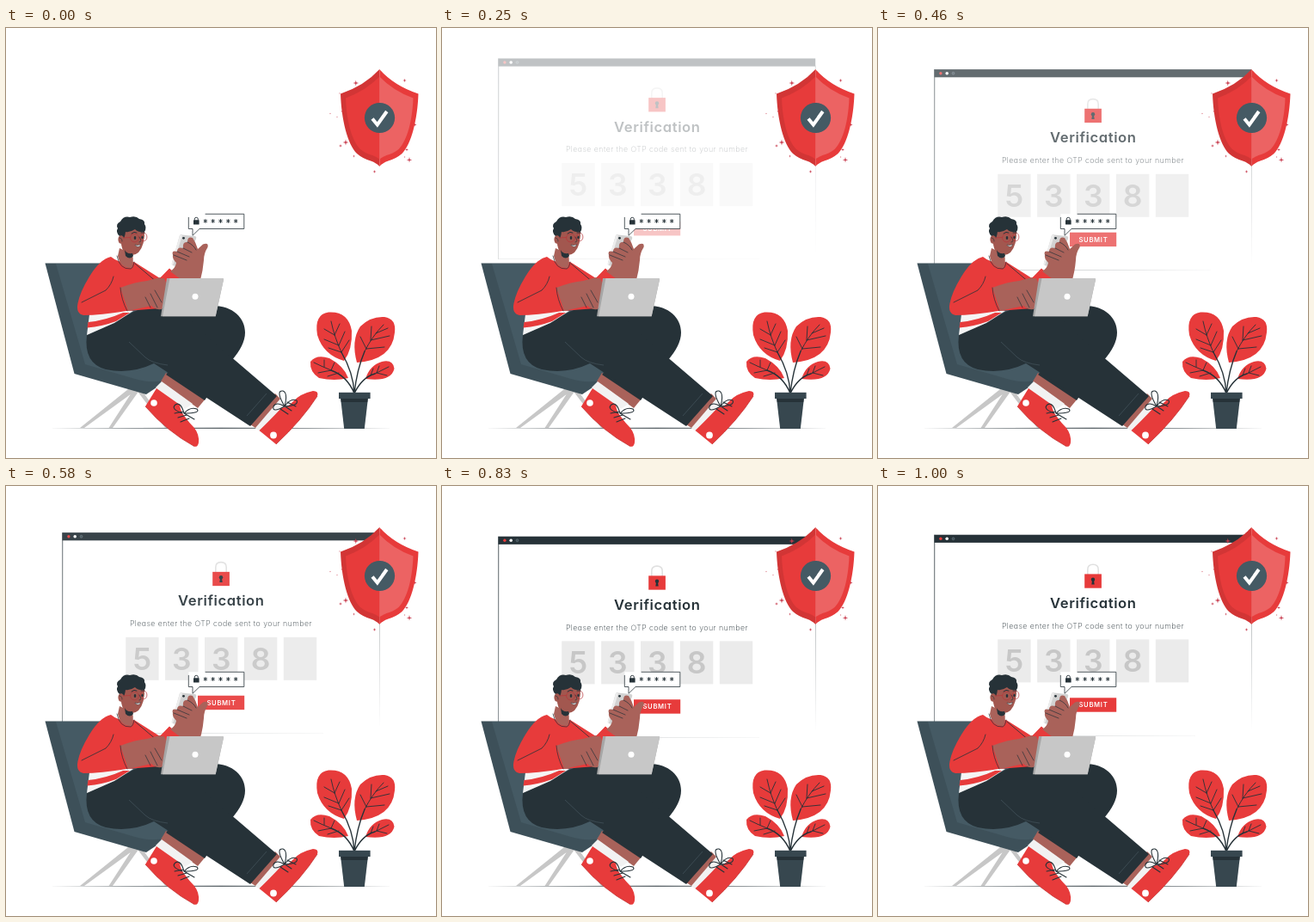
Write an HTML page that moves like this. It is 500 px wide and 500 px high and loops after 1.04 s.

```html
<!DOCTYPE html>
<html lang="en">
<head>
<meta charset="utf-8">
<title>Verification</title>
<style>
html, body { margin: 0; width: 100%; height: 100%; overflow: hidden; background: #fff; }
svg { display: block; width: 100%; height: 100%; }
text { font-family: Inter, Lato, sans-serif; font-feature-settings: "cv11"; text-anchor: middle; }
.red { fill: #e73b3b; }
.ink { fill: #263238; }
.slate { fill: #37474f; }
.skin { fill: #a9625a; }
.line { fill: none; stroke: #263238; stroke-linecap: round; stroke-linejoin: round; }
</style>
</head>
<body>
<svg viewBox="0 0 500 500">
  <path class="ink" d="M50 465.2L250 464.8L450 465.2L250 465.7Z"/>

  <g id="panel" opacity="0">
    <rect x="65.5" y="56.7" width="368.7" height="233.3" fill="#fff"/>
    <path class="ink" d="M65.4 56.7h.8L66 290h-.5zM65.5 289.7L405 290L65.5 290.2zM433.9 65h.5L434.2 282z"/>
    <rect class="ink" x="65.5" y="56.7" width="368.7" height="9.2"/>
    <circle class="red" cx="72.9" cy="61.3" r="1.7"/>
    <circle cx="80.2" cy="61.3" r="1.8" fill="#fff"/>
    <circle cx="87.5" cy="61.3" r="1.4" fill="#37474f" stroke="#74848b" stroke-width=".6"/>
    <path d="M243.8 103V97Q243.8 91.2 250 91.2T256.2 97V103" fill="none" stroke="#e0e0e0" stroke-width="1.6"/>
    <rect class="red" x="240.2" y="102.4" width="19.7" height="16.3"/>
    <path class="ink" d="M249 110L248.3 114.5H251.7L251 110Z"/>
    <circle class="ink" cx="250" cy="108.8" r="2.2"/>
    <text class="ink" x="250.3" y="141.8" font-size="16.6" font-weight="600" letter-spacing=".6">Verification</text>
    <text class="ink" x="249.9" y="165.6" font-size="8.8" font-weight="200" letter-spacing=".46">Please enter the OTP code sent to your number</text>
    <g id="boxes"></g>
    <rect class="red" x="223" y="246.3" width="54.2" height="16.4"/>
    <text x="250.4" y="257.3" font-size="7.7" font-weight="600" letter-spacing=".65" fill="#fff">SUBMIT</text>
  </g>

  <g id="chair">
    <path d="M142 420H153L91 465H86ZM146 424L156 420L124 465H119.5ZM151 420H157L189 465H185Z" fill="#c7c7c7"/>
    <path d="M45.5 273.5H128L200 380L184 412L163 426L79.5 402Z" fill="#3d5059"/>
    <path d="M58 274H136L190 380L186 410Q165 413 150 408L92 391Z" fill="#455a64"/>
  </g>

  <g id="legs">
    <path class="skin" d="M186 401L232 431L223 442L180 411Z"/>
    <path class="ink" d="M198 336L232 323C262 320 278 336 278 354Q278 369 262 387L231 433L186 403L205 385Z"/>
    <path d="M181 411L217 437L208 443L174 418Z" fill="#f2f2f2"/>
    <path class="red" d="M175 419L202 438Q203 446 208 452Q213 459 219 465Q225 473 224 482Q223 488 219 486.5Q187 469 162 440Z"/>
    <path d="M162 440Q187 469 219 486.5" fill="none" stroke="#c33131" stroke-width=".8"/>
    <circle cx="172" cy="436" r="3.8" fill="#fff"/>
    <path class="line" stroke-width="1.1" d="M196 448L206 446M200 453L210 450M203 458L213 454M205 448Q191 443 197 438Q203 434 207 448Q214 440 222 443Q227 448 207 448L219 455"/>

    <path d="M316 429L325 437L298 471L288 464Z" fill="#f2f2f2"/>
    <path class="skin" d="M313 425L319 431L290 465L284 461Z"/>
    <path class="red" d="M294.5 468Q306 457 321 441Q327 442 333 435Q342 425 357 422Q364 422 362 428Q344 456 314 484Z"/>
    <path d="M314 484Q344 456 362 428" fill="none" stroke="#c33131" stroke-width=".8"/>
    <circle cx="311" cy="473.5" r="3.9" fill="#fff"/>
    <path class="line" stroke-width="1.1" d="M319 443L328 449M323 439L332 445M327 435L337 440M324 440Q309 448 311 440Q314 434 324 440Q313 421 322 422Q328 424 324 440Q331 430 338 433Q341 439 324 440"/>
    <path class="ink" d="M94 357Q90 390 116 397Q145 403 172 390L284 463L315 428L232 357Q205 326 180 323Q154 323 130 341Z"/>
    <path d="M143 365L162 383Q170 390 188 392M280 451L303 425" fill="none" stroke="#45555d" stroke-width=".7"/>
  </g>

  <g id="body">
    <path d="M97 333L142 328L148 329L126 343L94 357Z" fill="#f5f5f5"/>
    <path class="red" d="M95.5 342Q116 340 136 331L144 331L128 341Q112 347 94.5 348.5Z"/>
    <path class="red" d="M122 266Q133 275 149 272L179 291L190 280L204 292L192 325L140 329Q110 334 90 334Q81 332 83.5 320Q86 307 97 289Q109 269 122 266Z"/>
    <path class="line" stroke="#a92a2a" stroke-width=".8" d="M125 289Q123 298 116 305L88 319M150 274L176 296"/>
    <path class="skin" d="M132 256L130 265Q133 280 146 279Q149 274 147 263Z"/>
    <path class="line" stroke-width=".7" d="M129 265Q132 281 145 280Q148 279 149 272"/>
    <path class="skin" d="M133 302Q151 295 164 294L183 289L188 300L181 327Q174 328 169 323L142 329Z"/>
    <path class="line" stroke-width=".7" d="M162 313L168 325M168 309L176 325M173 305L181 319M133 302Q134 316 141 329"/>
  </g>

  <g id="head">
    <path d="M134 235Q132 257 139 262Q147 267 154 261Q162 252 161 234Q146 225 134 235Z" fill="#a2574f"/>
    <path class="ink" d="M138 258Q140 263 147 262L148 265Q144 270 139 265Z"/>
    <path class="ink" d="M132 242Q127 237 130 233Q127 228 133 225Q137 218 144 220Q151 218 155 222Q162 223 161 228Q164 232 161 237Q154 238 150 234Q144 238 139 237Q138 245 135 247Z"/>
    <ellipse cx="133.8" cy="246" rx="3.4" ry="4.8" fill="#a2574f"/>
    <path class="line" stroke-width=".6" d="M132 244Q135 244 135 248"/>
    <g fill="none" stroke="#b93439" stroke-width=".7"><circle cx="149.5" cy="244" r="4.9"/><ellipse cx="160.3" cy="243" rx="3.6" ry="4.7"/><path d="M136 244L144.5 243.5"/></g>
    <ellipse class="ink" cx="150" cy="244" rx="1.3" ry="1.9"/><ellipse class="ink" cx="158.5" cy="243.5" rx="1.2" ry="1.8"/>
    <path class="line" stroke-width="1" d="M146 239Q149 236 152 238M157 238L161 238"/>
    <path class="line" stroke-width=".7" d="M155 243Q159 249 155 249"/>
    <path d="M150 252Q153.5 253.5 156.5 251.5Q155 256 150.5 253Z" fill="#fff" stroke="#263238" stroke-width=".5"/>
  </g>

  <g id="bubble" transform="translate(0 .3)">
    <path d="M212.3 216H276.8V233.2H225L217 241V233.2H212.3Z" fill="#fff"/>
    <path class="line" stroke-width=".8" d="M232 216H276.8V233.2H225L217 241V233.2H212.3V220"/>
    <rect class="ink" x="218" y="223" width="6.6" height="5.2" rx=".5"/>
    <path class="line" stroke-width=".9" d="M219.3 223V221.8Q219.3 220 221.3 220T223.3 221.8V223"/>
    <g id="asterisks" class="line" stroke-width="1"></g>
  </g>

  <g id="hand">
    <path class="red" d="M179 291L190 279.5L204 292Z"/>
    <path d="M202 241Q203 240 205 240.5L219 242Q222 242 221 245L208 278Q206 281 203 279L194 276Q192 275 193 273Z" fill="#d2d2d2"/>
    <path d="M202 241L193 273Q192 275 194 276L205 241Z" fill="#ededed"/>
    <circle class="ink" cx="206.5" cy="244.3" r="1.4"/>
    <path class="skin" d="M203 292L191 283Q197 279 198 273Q193 268 194 264Q192 258 199 260Q199 254 206 256Q205 248 211 249Q211 242 217 244Q221 250 223 257L229 251.5Q236 249 234.5 255Q230 262 230 270Q229 282 226 293Z"/>
    <path class="line" stroke-width=".7" d="M195 264L210 270M199 260L213 266M206 256L216 261M211 249Q218 252 221 258"/>
  </g>
  <g id="laptop">
    <path d="M187 291H251.5Q253.3 291 253 292.5L243.7 335.2H180Z" fill="#a6a6a6"/>
    <path d="M190.5 291H251.5Q253.3 291 253 292.5L243.7 335.2H182Z" fill="#c7c7c7"/>
    <circle cx="220" cy="312.3" r="3.5" fill="#fff"/>
  </g>

  <g id="plant">
    <path class="red" d="M393 387Q369 380 362 357Q358 333 375 330.5Q398 329 402 352Q403 374 393 387ZM408 389Q401 363 412 347Q424 335 440 336Q454 338 452 354Q449 386 408 389ZM398 407Q382 411 364 407Q353 400 354 388Q361 379 376 384Q393 393 398 407ZM418 408Q423 392 437 388Q450 385 451.5 396Q448 412 418 408Z"/>
    <path class="line" stroke-width="1.4" d="M405 425Q404 401 390 377M405 425Q408 397 417 376M405 425Q397 405 378 398M405 425Q414 406 429 402"/>
    <path class="line" stroke-width=".9" d="M390 377Q382 360 378 341M382 357L370 350M382 357L388 344M387 369L370 362M387 369L394 353M390 377L375 372M390 377L399 363M417 376Q426 358 439 345M424 363L425 347M424 363L446 358M419 373L412 359M419 373L440 371M430 355L444 349M378 398Q366 393 358 389M370 394L370 386M378 398L382 389M378 398L363 401M387 401L374 405M429 402Q437 398 445 394M431 401L434 393M431 401L443 404M424 404L427 396"/>
    <path class="slate" d="M389 430H421L416.8 466H393.2Z"/>
    <path class="ink" d="M389.3 431H420.7L420.2 435H389.8Z"/>
    <rect class="slate" x="387" y="423.8" width="36.6" height="7.2"/>
  </g>

  <g id="shield">
    <g id="stars" fill="#c83c4e"></g>
    <path d="M434.3 48Q417 67 389 76.5C390 106 397 135 408 146Q415 152 424 154.5Q431 157 434.3 161Z" fill="#d23535"/>
    <path class="red" d="M434.3 48Q451 67 479.5 76.5C478.5 106 471.5 135 460.5 146Q453.5 152 444.5 154.5Q437.5 157 434.3 161Z"/>
    <path class="red" d="M434.3 56.5Q418 73 395 81.5C396 108 402 131 412 141Q418 146 426 148Q431 150 434.3 152.5Z"/>
    <path d="M434.3 56.5Q450 73 473.5 81.5C472.5 108 466.5 131 456.5 141Q450.5 146 442.5 148Q437.5 150 434.3 152.5Z" fill="#ec6363"/>
    <circle cx="434.5" cy="104.5" r="17.6" fill="#455a64"/>
    <path d="M426 105.5L431.8 112.5L442.8 97" fill="none" stroke="#fff" stroke-width="4"/>
  </g>
</svg>
<script>
const byId = id => document.getElementById(id);
const LOOP = 1040, STEP = 41.6, DROP = 30;

byId("boxes").innerHTML = [..."5338", ""].map((digit, i) => {
  const x = 139.2 + i * 45.9;
  return `<rect x="${x}" y="178.4" width="38.4" height="50" fill="#ebebeb"/>
    <text x="${x + 19.2}" y="216.4" font-size="35.5" font-weight="600" fill="#c7c7c7">${digit}</text>`;
}).join("");

byId("asterisks").innerHTML = [0, 1, 2, 3, 4].map(i =>
  `<path d="M${231.8 + i * 8.85} 222.3v3.8m-1.7 -2.9l3.4 2m0 -2l-3.4 2"/>`).join("");

const star = ([x, y, r]) => {
  const c = r * .2;
  return `<path d="M${x} ${y - r}L${x + c} ${y - c}L${x + r} ${y}L${x + c} ${y + c}L${x} ${y + r}L${x - c} ${y + c}L${x - r} ${y}L${x - c} ${y - c}Z"/>`;
};
byId("stars").innerHTML = [
  [406.8, 64, 3.3], [463.5, 61, 2.2], [391.3, 97, 2], [395, 133, 3.4], [389, 137, 2],
  [404.5, 149, 1.8], [428.5, 167, 2], [466, 141.5, 2], [469, 153.3, 3.3], [475.6, 112.5, 2],
  [377, 99.5, 1], [385, 103.5, .9], [463.5, 150, 1], [388, 76, 1]
].map(star).join("");

const bezier = (a, b, s) => 3 * a * s * (1 - s) ** 2 + 3 * b * s * s * (1 - s) + s ** 3;

// Cubic easing that overshoots before settling at 1
function ease(x) {
  let low = 0, high = 1;
  for (let i = 0; i < 30; i++) {
    const mid = (low + high) / 2;
    if (bezier(.36, .5, mid) < x) low = mid; else high = mid;
  }
  return bezier(-.01, 1.38, low);
}

function render(time) {
  const step = Math.floor((time % LOOP + 3.3) / STEP);
  const progress = ease(Math.min(1, (step + 1.1) / 25));
  const panel = byId("panel");
  panel.setAttribute("opacity", step < 2 ? 0 : Math.min(1, progress));
  panel.setAttribute("transform", `translate(0 ${DROP * (progress - 1)})`);
}

const start = performance.now();
function tick() {
  render(performance.now() - start);
  requestAnimationFrame(tick);
}
tick();
</script>
</body>
</html>
```
